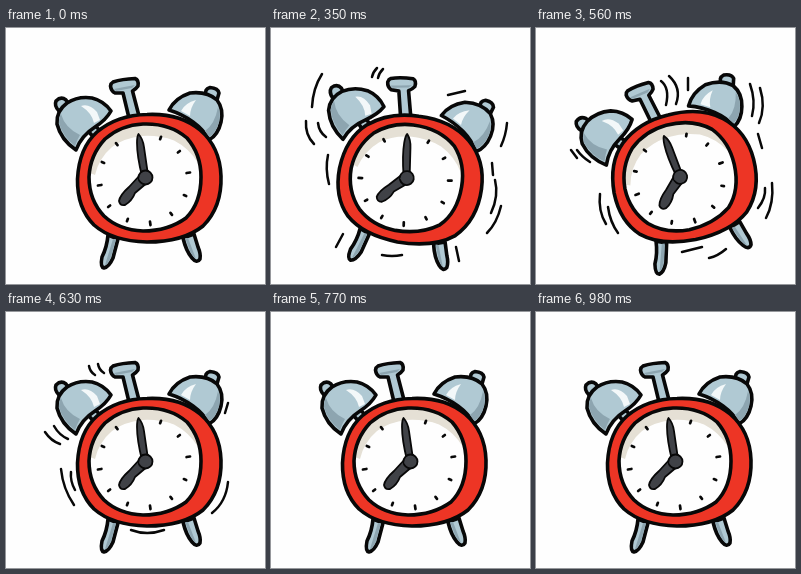
Animation of 259x256 px, one loop 1.05 s. Source, as an HTML page:

```html
<!DOCTYPE html>
<html lang="en">
<head>
<meta charset="utf-8">
<title>Alarm clock</title>
<style>
html, body { margin: 0; width: 100%; height: 100%; overflow: hidden; background: #fefefe; }
svg { display: block; width: 100vw; height: 100vh; }
.ink { stroke: #080808; stroke-width: 3.6; stroke-linejoin: round; stroke-linecap: round; }
.steel { fill: #b0c9d3; }
.shade { fill: #8da5b0; }
.shine { fill: #f3f8f9; }
.hand { fill: #404247; stroke: #080808; stroke-width: 1.8; stroke-linejoin: round; }
#ticks { stroke: #080808; stroke-width: 2.7; stroke-linecap: round; }
#lines { fill: none; stroke: #080808; stroke-width: 2.5; stroke-linecap: round; }
</style>
</head>
<body>
<svg viewBox="0 0 259 256" preserveAspectRatio="none">
  <defs>
    <path id="face" d="M137 96 Q164 95 181 110 Q195 126 195 149 Q195 175 180 190 Q162 203 137 203 Q113 202 98 188 Q83 172 83 149 Q84 127 99 111 Q115 97 137 96Z"/>
  </defs>
  <g id="clock">
    <!-- feet -->
    <path class="ink steel" d="M102 207 Q101 219 96 229 Q94 239 98 240 Q103 239 107 230 L112 211Z"/>
    <path class="ink steel" d="M177 210 Q180 223 186 230 Q191 236 194 231 Q195 226 192 219 L188 206Z"/>
    <path class="shade" d="M107 211 L110 211 L105 229 Q102 236 99 237Z M179 210 L182 210 L190 231 Q187 229 184 223Z"/>
    <!-- bell stems -->
    <path class="ink steel" d="M82 103 L91 113 L98 106 L88 97Z M180 96 L173 102 L181 108 L187 101Z"/>
    <!-- winding knob -->
    <path class="ink steel" d="M107 54 Q116 51 129 50.500 Q133 52 132 58 Q130 61 126.500 63 L133 88 L123 90 L117 65 L109 65 Q105 63 104.500 58 Q105 55 107 54Z"/>
    <path class="shade" d="M108 61 Q118 59 129 57 L126 60 L110 63Z"/>
    <!-- left bell -->
    <path class="ink steel" d="M53 83 Q48 78 50 73 Q55 68 60 72 L63 76Z"/>
    <path class="ink steel" d="M70 122 Q55 112 51 96 Q50 83 61 75 Q72 68 86 70 Q98 73 105 83 Q100 92 89 99 Q75 108 70 122Z"/>
    <path class="shade" d="M69 118 Q57 109 53 95 Q53 89 55 86 Q59 100 74 107 Q71 112 69 118Z"/>
    <path class="shine" d="M75 78 Q83 75 91 84 L94 92 L88 95 Q86 85 75 78Z"/>
    <!-- right bell -->
    <path class="ink steel" d="M200 68 Q198 61 204 59.500 Q212 60 213 65 L211 72Z"/>
    <path class="ink steel" d="M163 82 Q169 70 184 65 Q201 63 211 72 Q218 81 215 94 Q212 107 203 112 Q198 102 187 94 Q176 86 163 82Z"/>
    <path class="shade" d="M203 109 L199 103 Q209 96 212 79 Q215 87 213 94 Q210 105 203 109Z"/>
    <path class="shine" d="M175 83 Q179 75 190 72 Q184 80 184 88Z"/>
    <!-- case and dial -->
    <path class="ink" fill="#ed3525" d="M141 86.500 Q174 85 194 102 Q214 119 215 148 Q216 179 197 198 Q177 214 141 214 Q106 213 88 197 Q71 180 71.500 151 Q73 120 91 104 Q111 87 141 86.500Z"/>
    <use href="#face" fill="#fefefe"/>
    <path fill="#e5e0d5" d="M84 145 Q84 127 99 111 Q115 97 137 96 Q164 95 181 110 Q190 121 192 135 Q183 120 168 112.500 Q153 107 136 108 Q118 110 106 119 Q93 130 89 147Z"/>
    <use href="#face" class="ink" fill="none"/>
    <g id="ticks"></g>
    <!-- hands -->
    <path class="hand" d="M136 148 Q131 128 131 115 Q131 108 132.500 106 Q137 111 138 119 L142 147Z"/>
    <path class="hand" d="M134 147 L123 159 Q114 167 113 173 Q114 178 119 177 Q126 173 129 165 L142 154Z"/>
    <circle class="hand" cx="139.500" cy="149.500" r="7"/>
    <path fill="#404247" d="M136 145 L142 146 L142 152 L138 155 L133 151Z"/>
  </g>
  <path id="lines"/>
</svg>
<script>
const LOOP = 1050;
const clock = document.getElementById('clock');
const lines = document.getElementById('lines');

// The case swings about the hub of the hands.
const hub = [139, 149.5];
const pose = (x, y, turn) =>
  `translate(${x} ${y}) rotate(${turn}) translate(${-hub[0]} ${-hub[1]})`;
const rest = pose(...hub, 0);
const right = pose(135.3, 150, 9.7);
const left = pose(143.7, 149, -12.5);

const burst = 'M18 58Q3 87 8 117M34 95Q31 113 40 130M58 57L82 56M67 41L87 39' +
  'M136 43Q147 49 145 61M149 44Q154 51 152 60M159 55L159 59M180 42L188 39' +
  'M222 87L219 98M233 87L231 97M217 170Q214 188 205 201M224 184L218 200' +
  'M59 185Q63 194 70 199M124 226Q135 229 146 224';
const rightLow = 'M51 46Q42 60 41 79M35 93Q34 107 43 116M47 95Q48 104 55 109' +
  'M57 127Q54 141 58 156M177 67L194 63M236 95Q235 107 230 118M221 135L222 147' +
  'M224 152Q228 168 220 185M230 178Q226 195 216 205' +
  'M111 227Q121 229 131 227M185 219L188 233M72 206L65 219';
const rightTop = 'M101 49Q102 44 106 40M107 50Q108 45 112 41';
const leftSwing = 'M41 122Q46 129 54 134M35 122L41 130M64 166Q62 183 70 196' +
  'M72 179Q74 194 82 205M125 53Q134 60 130 77M133 48Q146 60 140 76M152 50L152 62' +
  'M214 56Q220 73 216 88M224 60Q230 79 223 95M222 106L226 120' +
  'M236 155Q238 175 230 190M229 160Q230 170 222 180M146 224L166 219M173 230Q182 228 190 221';
const settle = 'M39 120Q45 129 54 132M48 114Q53 123 62 127M83 54Q84 60 89 63' +
  'M92 52Q93 58 98 61M55 157Q57 177 68 193M65 160Q64 169 69 178' +
  'M222 91L219 101M222 170Q220 190 206 201M125 218Q141 224 158 218';

const steps = [
  [0, rest, ''],
  [210, rest, burst],
  [280, rest, settle],
  [350, right, rightLow + rightTop],
  [420, rest, settle],
  [560, left, leftSwing],
  [630, rest, settle],
  [700, right, rightLow],
  [770, rest, ''],
  [910, left, ''],
  [980, rest, '']
];

function addTicks() {
  const svgNS = 'http://www.w3.org/2000/svg';
  const dial = document.getElementById('ticks');
  for (let hour = 1; hour < 12; hour++) {
    const tick = document.createElementNS(svgNS, 'path');
    const length = hour % 3 ? 2.5 : 3.5;
    tick.setAttribute('d', `M0 -43v${-length}`);
    tick.setAttribute('transform', `translate(138 151) rotate(${hour * 30 - 8})`);
    dial.append(tick);
  }
}

function draw(time) {
  const t = time % LOOP;
  const [, transform, path] = steps.findLast(([at]) => at <= t);
  clock.setAttribute('transform', transform);
  lines.setAttribute('d', path);
}

addTicks();
draw(0);
const start = performance.now();
function tick() {
  draw(performance.now() - start);
  requestAnimationFrame(tick);
}
requestAnimationFrame(tick);
</script>
</body>
</html>
```
